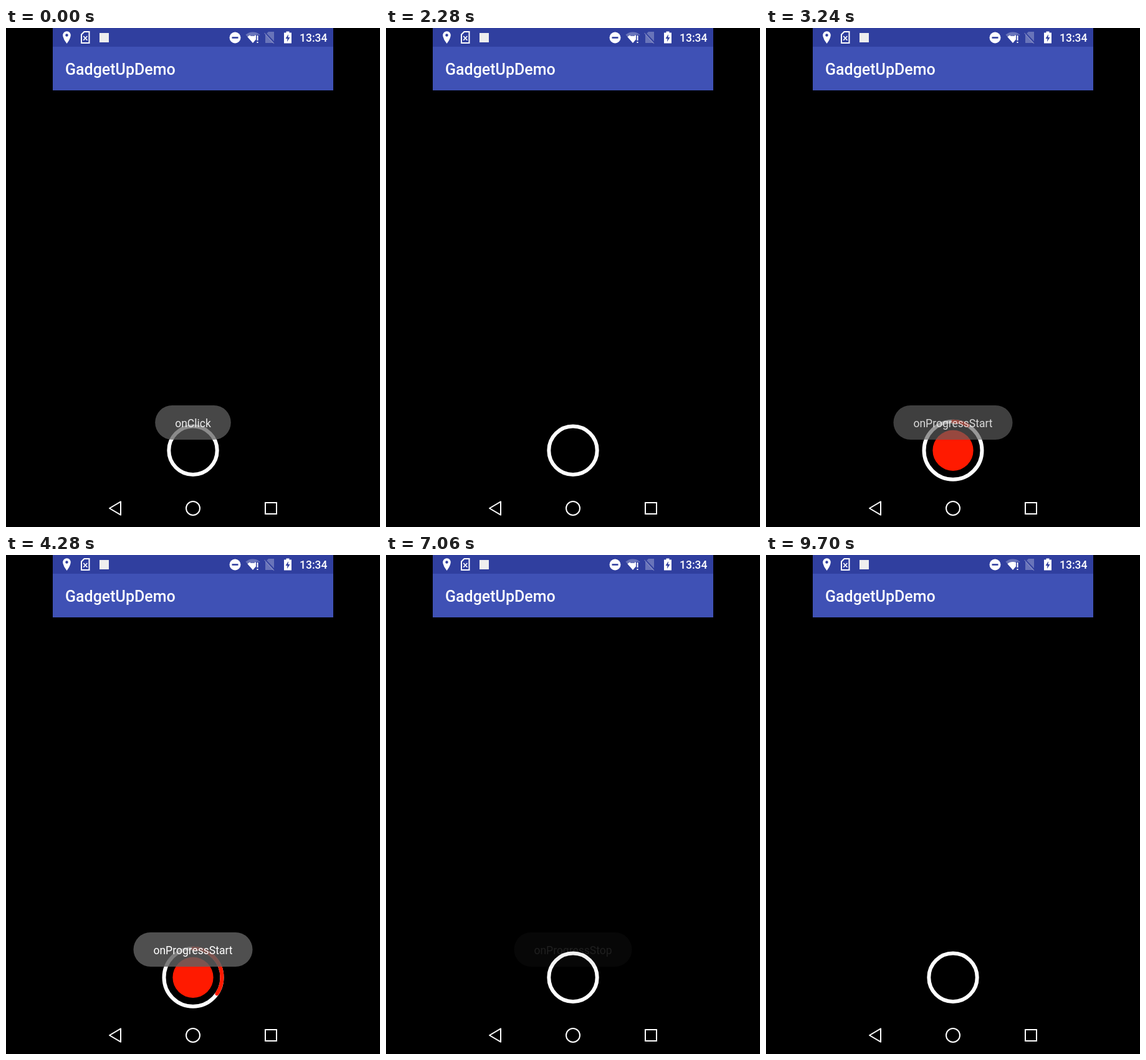
Recreate the animation shown at these times as an HTML page with a canvas. Size 600x800 px, loop 9.98 s.

```html
<!DOCTYPE html>
<html lang="en">
<head>
<meta charset="utf-8">
<title>Record button</title>
<style>
html, body { margin: 0; width: 100%; height: 100%; overflow: hidden; background: #000; }
canvas { display: block; width: 600px; height: 800px; }
</style>
</head>
<body>
<canvas id="stage" width="600" height="800"></canvas>
<script>
const ctx = document.getElementById('stage').getContext('2d');
const LOOP = 9980;
const CX = 300, CY = 677.3;
const RED = '#ff1a00', WHITE = '#fff';
const STATUS = '#303f9f', BAR = '#3f51b5';
const DIM = 'rgba(255,255,255,.28)';
const FADE = 400, HOLD = 1970;
const FILL_START = 2900, FILL_END = 6900;

const toasts = [
  { text: 'onClick', start: -270 },
  { text: 'onProgressStart', start: 3020 },
  { text: 'onProgressStop', start: 7040 }
];

const clamp = x => Math.max(0, Math.min(1, x));
const span = (t, a, b) => clamp((t - a) / (b - a));
const ease = x => (1 - Math.cos(x * Math.PI)) / 2;

function box(x, y, w, h, color) {
  ctx.fillStyle = color;
  ctx.fillRect(x, y, w, h);
}

function disc(x, y, r, color) {
  ctx.beginPath();
  ctx.arc(x, y, r, 0, Math.PI * 2);
  ctx.fillStyle = color;
  ctx.fill();
}

function arc(x, y, r, width, color, from = 0, to = Math.PI * 2) {
  ctx.beginPath();
  ctx.arc(x, y, r, from, to);
  ctx.lineWidth = width;
  ctx.strokeStyle = color;
  ctx.stroke();
}

function trace(points) {
  ctx.beginPath();
  points.forEach(([x, y]) => ctx.lineTo(x, y));
}

function poly(points, color) {
  trace(points);
  ctx.closePath();
  ctx.fillStyle = color;
  ctx.fill();
}

function line(points, width, color, closed = false) {
  trace(points);
  if (closed) ctx.closePath();
  ctx.lineWidth = width;
  ctx.strokeStyle = color;
  ctx.stroke();
}

function label(text, x, y, size, weight = 400, align = 'left') {
  ctx.font = `${weight} ${size}px Roboto, sans-serif`;
  ctx.textAlign = align;
  ctx.fillStyle = WHITE;
  ctx.fillText(text, x, y);
}

function fan(r, color) {
  const half = 0.72;
  ctx.beginPath();
  ctx.moveTo(396, 24);
  ctx.arc(396, 24, r, -Math.PI / 2 - half, -Math.PI / 2 + half);
  ctx.closePath();
  ctx.fillStyle = color;
  ctx.fill();
}

function pin() {
  ctx.beginPath();
  ctx.arc(97.5, 11.5, 6.3, Math.PI * 0.92, Math.PI * 0.08);
  ctx.quadraticCurveTo(102.5, 19, 97.5, 25);
  ctx.quadraticCurveTo(92.5, 19, 91.2, 13);
  ctx.fillStyle = WHITE;
  ctx.fill();
  disc(97.5, 11.5, 2.2, STATUS);
}

function card() {
  line([[125.5, 6], [133.5, 6], [133.5, 24], [121, 24], [121, 10.5]], 2, WHITE, true);
  line([[124.2, 13], [130.4, 19.6]], 1.6, WHITE);
  line([[130.4, 13], [124.2, 19.6]], 1.6, WHITE);
}

function wifi(t) {
  fan(17.5, DIM);
  fan(13, WHITE);
  if (t < 8680) box(392, 8, 7, 5, '#6a75ba');
  box(401, 11, 5, 14, STATUS);
  box(402.5, 12, 2, 8, WHITE);
  box(402.5, 22, 2, 2, WHITE);
}

function sim() {
  poly([[421, 6], [430, 6], [430, 24], [416, 24], [416, 11]], DIM);
  line([[415, 7], [431, 24]], 2.4, STATUS);
  line([[414.5, 8], [430, 25]], 1.2, DIM);
}

function battery() {
  box(449.5, 5.5, 5, 3, WHITE);
  box(446, 7.5, 12, 17, WHITE);
  poly([[453, 10], [448.5, 17], [451.5, 17], [451, 22], [455.5, 15], [452.5, 15]], STATUS);
}

function header(t) {
  box(75, 0, 450, 30, STATUS);
  box(75, 30, 450, 70, BAR);
  pin();
  card();
  box(150, 8, 15, 15, '#eee');
  disc(367.5, 15.5, 9, WHITE);
  box(362.5, 14.2, 10, 2.6, STATUS);
  wifi(t);
  sim();
  battery();
  label('13:34', 471, 22, 17.5, 500);
  label('GadgetUpDemo', 95, 75, 25, 500);
}

function navigation() {
  ctx.lineJoin = 'round';
  line([[166, 770], [184, 759.3], [184, 780.7]], 2, WHITE, true);
  ctx.lineJoin = 'miter';
  arc(300, 770, 11, 2, WHITE);
  ctx.strokeRect(416, 761, 18, 18);
}

function button(t) {
  const active = t < FILL_END;
  const grow = active ? ease(span(t, 2400, 2600)) : 0;
  const core = active ? ease(span(t, 2590, 2890)) : 0;
  const r = 38.7 + 7.8 * grow;
  arc(CX, CY, r, 6, WHITE);
  if (core > 0) disc(CX, CY, 32.6 * core, RED);
  if (active && t > FILL_START) {
    const top = -Math.PI / 2;
    ctx.lineCap = 'round';
    arc(CX, CY, r, 6, RED, top, top + span(t, FILL_START, FILL_END) * Math.PI * 2);
    ctx.lineCap = 'butt';
  }
}

function toast(t, { text, start }) {
  const inPart = span(t, start, start + FADE);
  const outPart = span(t, start + HOLD, start + HOLD + FADE);
  const alpha = (1 - (1 - inPart) ** 2) * (1 - outPart ** 2);
  if (alpha <= 0) return;
  ctx.globalAlpha = alpha;
  ctx.font = '400 17.5px Roboto, sans-serif';
  const w = ctx.measureText(text).width + 64;
  ctx.beginPath();
  ctx.roundRect(CX - w / 2, 605, w, 55, 27.5);
  ctx.fillStyle = 'rgba(97,97,97,.82)';
  ctx.fill();
  label(text, CX, 639.5, 17.5, 400, 'center');
  ctx.globalAlpha = 1;
}

function draw(now) {
  const t = now % LOOP;
  box(0, 0, 600, 800, '#000');
  header(t);
  button(t);
  toasts.forEach(item => toast(t, item));
  navigation();
}

let begin;
function tick(now) {
  begin ??= now;
  draw(now - begin);
  requestAnimationFrame(tick);
}
draw(0);
requestAnimationFrame(tick);
</script>
</body>
</html>
```
